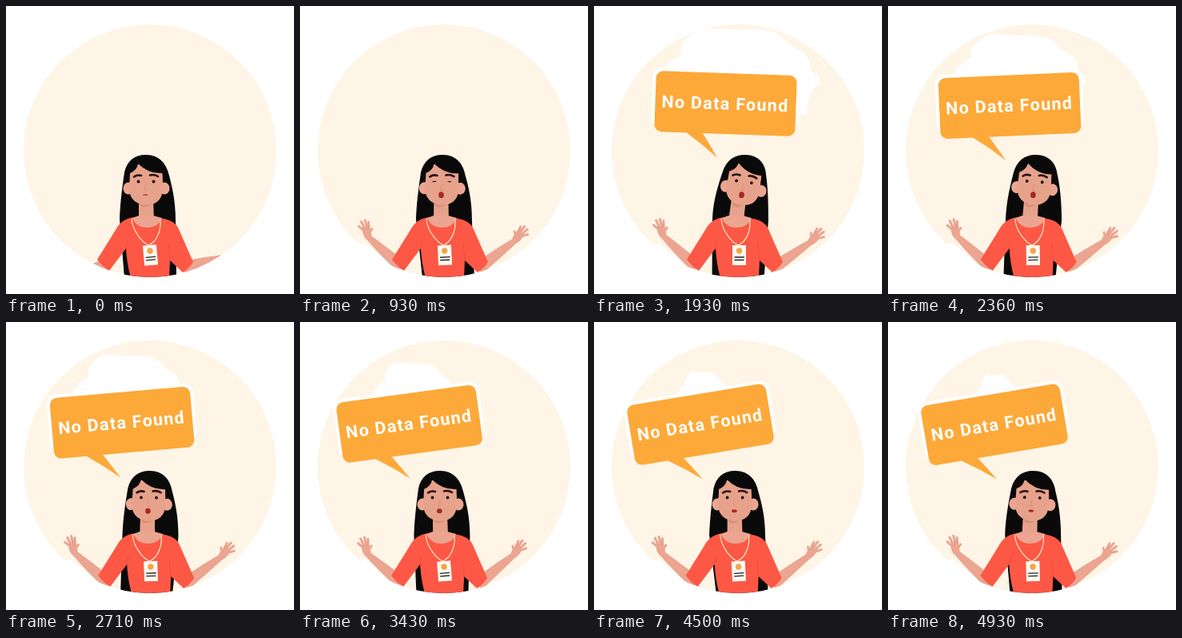
Recreate the animation shown at these times as an HTML page with a canvas. Size 360x360 px, loop 5000 ms.

```html
<!DOCTYPE html>
<html lang="en">
<head>
<meta charset="utf-8">
<title>No Data Found</title>
<style>
html, body { margin: 0; width: 100%; height: 100%; overflow: hidden; background: #fff; }
canvas { display: block; width: 360px; height: 360px; }
</style>
</head>
<body>
<canvas id="stage"></canvas>
<script>
const canvas = document.getElementById('stage');
const ctx = canvas.getContext('2d');
const ratio = window.devicePixelRatio || 1;
canvas.width = canvas.height = 360 * ratio;

const LOOP = 5000, FPS = 14, RISE = 570, POP = 1000, SWAY = 3750;
const CREAM = '#fef5e7', SKIN = '#eba590', FACE = '#e7a28c', SHADE = '#d98f7a';
const SHIRT = '#fc5845', HAIR = '#0b0a0b', ORANGE = '#fca939';

const rad = deg => deg * Math.PI / 180;
const clamp = v => Math.max(0, Math.min(1, v));
const easeOut = p => 1 - (1 - clamp(p)) ** 2;
const backOut = p => 1 + 2.2 * (p - 1) ** 3 + 1.2 * (p - 1) ** 2;

function fill(color, d) {
  ctx.fillStyle = color;
  ctx.fill(new Path2D(d));
}

function stroke(color, width, d) {
  ctx.strokeStyle = color;
  ctx.lineWidth = width;
  ctx.lineCap = ctx.lineJoin = 'round';
  ctx.stroke(new Path2D(d));
}

function oval(color, x, y, rx, ry = rx) {
  ctx.fillStyle = color;
  ctx.beginPath();
  ctx.ellipse(x, y, rx, ry, 0, 0, 7);
  ctx.fill();
}

function box(color, x, y, w, h, r) {
  ctx.fillStyle = color;
  ctx.beginPath();
  ctx.roundRect(x, y, w, h, r);
  ctx.fill();
}

function at(x, y, deg, draw, sx = 1, sy = sx) {
  ctx.save();
  ctx.translate(x, y);
  ctx.rotate(rad(deg));
  ctx.scale(sx, sy);
  draw();
  ctx.restore();
}

// Unit cloud: x from -1 to 1, base at 0, top at -1.
function drawCloud() {
  fill('#fff', `M-1 .6 L-1 -.05 Q-.9 -.38 -.68 -.5 Q-.76 -.76 -.43 -1
    Q-.2 -1 .04 -.97 Q.4 -1.02 .55 -.86 L.72 -.64 Q.92 -.56 .93 -.2
    Q1.08 -.12 1.03 .05 Q.9 .1 .88 .6Z`);
}

function drawBubble() {
  box('#fff', -92, -42, 184, 72, 11);
  box(ORANGE, -88, -38, 176, 76, 9);
  fill(ORANGE, 'M-49 37 Q-27 52 -8 68 Q-18 52 -28 37Z');
  ctx.fillStyle = '#fff';
  ctx.font = '700 21.5px Roboto, sans-serif';
  ctx.letterSpacing = '1.3px';
  ctx.textAlign = 'center';
  ctx.fillText('No Data Found', -.5, 7.5);
}

function drawHand() {
  fill(SKIN, 'M-3.5 2 Q-7 -6 -5 -11 L4 -11 Q6 -4 3.5 2Z');
  stroke(SKIN, 3, 'M-4 -9 L-9 -15 M-2 -10 L-5 -20 M1 -10 L0 -21 M3 -10 L4 -18');
  stroke(SKIN, 2.8, 'M2 -4 L7 -9');
  stroke(SHADE, .5, 'M-3 -10 L-4 -14 M0 -10 L-.5 -15 M2.5 -10 L3 -14');
}

function drawArm(ex, ey, wx, wy, swing, turn, flip) {
  const dx = wx - ex, dy = wy - ey, len = Math.hypot(dx, dy);
  at(ex, ey, swing, () => {
    at(0, 0, Math.atan2(dy, dx) * 180 / Math.PI, () =>
      fill(SKIN, `M-4 -8 Q${len * .5} -7 ${len} -3.5 L${len + 1} 3.5 Q${len * .5} 6 -4 8Z`));
    at(dx, dy, turn, drawHand, flip, 1);
  });
}

function drawBackHair(crown, low, tips) {
  const mid = (crown + low) / 2;
  fill(HAIR, `M${175 + crown} 186 C${192 + crown} 186 ${201 + crown} 198 ${204 + crown * .8} 212
    C${207 + mid} 224 ${212 + low} 242 ${212 + low} 268 L${212 + tips} 340 L${147 + tips} 340
    L${142 + low} 266 C${143 + low} 242 ${146 + mid} 222 ${148 + crown * .9} 208
    C${151 + crown} 194 ${160 + crown} 186 ${175 + crown} 186Z`);
}

function drawTorso(badgeAngle) {
  fill(SHIRT, `M160 264 Q144 266 137 280 L114 317 Q121 326 129 331 L150 303 Q151 322 156 340
    L204 340 L205 318 L221 333 Q229 328 234 320 L216 279 Q211 267 192 265Z`);
  stroke('#e44836', .6, 'M150 303 L152 292 M205 318 L203 297');
  fill(SKIN, 'M158 265 Q163 277 176 277 Q190 277 195 265 L184 262 L166 262Z');
  stroke('#f9e3c3', 1.2, 'M157 266 C158 281 170 295 178 299 C188 295 194 282 193 267');
  at(179.5, 300, badgeAngle, () => {
    box('#fffaf2', -8.5, -1, 17, 25, 0);
    oval('#f3a548', 0, 6, 3.7);
    stroke('#222', 1.3, 'M-5.5 14 H6 M-5.5 17.5 H5.5');
  });
}

function drawFace(blink, mouth) {
  for (const x of [153, 198]) oval(SKIN, x, 228, 6.5, 7.5);
  fill(FACE, 'M154 208 Q160 196 176 196 Q193 197 196 209 L196 229 Q195 248 175 249 Q155 247 154 229Z');
  fill(HAIR, 'M152 219 Q149 193 175 190 Q198 190 199 219 L196 221 L195.5 209 Q178 210 165 197 Q164 205 155 209 L154.5 220Z');
  stroke('#251312', 2.6, 'M160 213.5 Q164 210.5 169 212 M180 211.5 Q185 210 190 213');
  for (const x of [165.5, 184.5]) oval('#1b0e0e', x, 219.5, blink ? 2.6 : 1.9, blink ? .7 : 1.9);
  stroke(SHADE, .9, 'M175 222 L173 229.5 Q174 231 176.5 230');
  oval('#a52a24', 174.3, 236.2, 3.3, .6 + 3.3 * mouth);
}

function drawSpeech(t, sway) {
  // The bubble swings leftwards and settles.
  const swing = Math.min(1.65, Math.exp((1930 - t) / 900));
  const size = backOut(clamp((t - POP + 70) / 360));
  at(170, 185, 0, () => {
    ctx.translate(-170, -185);
    at(133 + 45 * Math.min(1, swing), 95, 0, drawCloud,
      100 * Math.min(1, swing ** .4), 67 * Math.min(1, swing ** .25));
    at(130.5 + 32 * swing + 2 * sway, 128.5 - 6.5 * swing, -10 + 12 * swing, drawBubble);
  }, Math.max(.1, size));
}

function drawWoman(t, sway) {
  const lift = easeOut(t / RISE);
  const lean = sway ** 2, tilt = 8 * sway ** 4;
  const bodyX = 2 * sway, headX = 9 * lean;
  const neck = 166 + headX * .65;
  const mouth = lift * (1 - .7 * clamp((t - 2300) / 2600));

  drawBackHair(14 * lean, 6 * sway, 1 + 5 * Math.sin(2 * Math.PI * t / SWAY));
  drawArm(124 + bodyX, 324, 84 + 2 * sway, 290 - 3 * sway, -58 * (1 - lift), -10, 1);
  drawArm(225 + bodyX, 326, 267 + 4 * sway, 291 + 4 * sway, 27 * (1 - lift), 30 + 8 * sway, -1);
  fill(FACE, `M${neck} 242 L${neck + 18} 242 L${185 + bodyX} 269 L${166 + bodyX} 269Z`);
  at(bodyX, 0, 0, () => drawTorso(5 * sway - 5));
  fill(SHADE, `M${neck} 246 L${neck + 18} 246 Q${neck + 12} 253 ${neck + 3} 251Z`);
  at(175 + headX, 245, tilt, () => {
    ctx.translate(-175, -245);
    drawFace(t > 850 && t < POP, mouth);
  });
}

function render(t) {
  const sway = Math.sin(Math.PI * t / SWAY) ** 2;
  ctx.setTransform(ratio, 0, 0, ratio, 0, 0);
  box('#fff', 0, 0, 360, 360, 0);
  oval(CREAM, 180, 181, 158);
  if (t >= POP) drawSpeech(t, sway);
  if (t >= RISE) fill('#fff', 'M40 297 L82 297 L122 330 L118 350Z');

  ctx.save();
  ctx.beginPath();
  ctx.arc(180, 181, 158, 0, 7);
  ctx.clip();
  drawWoman(t, sway);
  ctx.restore();
}

const start = performance.now();
function tick() {
  const elapsed = (performance.now() - start) % LOOP;
  const step = Math.floor(elapsed * FPS / 1000 + .1) % (LOOP * FPS / 1000);
  render(step * 1000 / FPS);
  requestAnimationFrame(tick);
}
tick();
</script>
</body>
</html>
```
